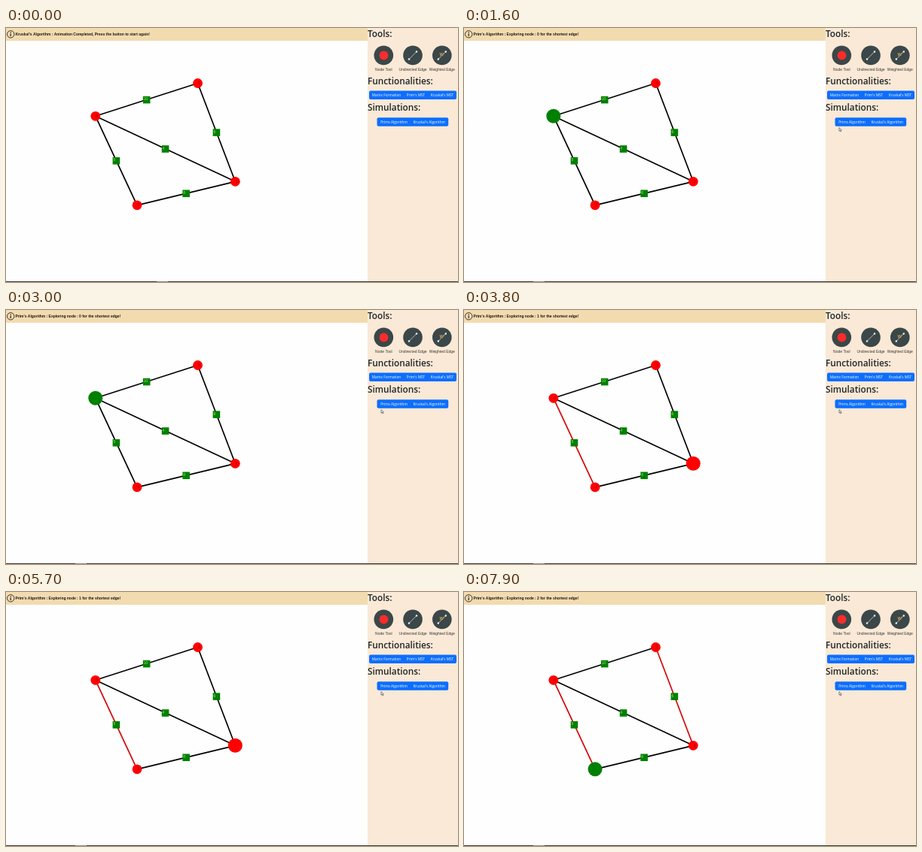
These frames come from a looping animation (600x338 px, 8 s). An HTML page with a canvas:

```html
<!DOCTYPE html>
<html lang="en">
<head>
<meta charset="utf-8">
<title>Minimum spanning tree</title>
<style>
html, body { margin: 0; width: 100%; height: 100%; overflow: hidden; background: #fff; }
canvas { display: block; width: 600px; height: 338px; }
</style>
</head>
<body>
<canvas id="stage" width="600" height="338"></canvas>
<script>
const ctx = document.getElementById('stage').getContext('2d');
const LOOP = 8000, START = 700, STEP = 3000;
const ARIAL = '"Liberation Sans", Arial, sans-serif';
const UI = '"Open Sans", "Noto Sans", sans-serif';

const nodes = [[118.8, 117.3], [304.3, 204.3], [174, 235.8], [254.5, 73.5]];
// from, to, weight, step at which the edge joins the tree
const edges = [
  [0, 3, '10', 9], [0, 1, '4', 9], [0, 2, '5', 1], [3, 1, '6', 2], [2, 1, '8', 9]
];
const activeColor = ['#008000', '#ff0000', '#008000'];

function text(str, x, y, font, color, align = 'left') {
  ctx.font = font;
  ctx.fillStyle = color;
  ctx.textAlign = align;
  ctx.fillText(str, x, y);
}

function disc(x, y, r, color) {
  ctx.fillStyle = color;
  ctx.beginPath();
  ctx.arc(x, y, r, 0, Math.PI * 2);
  ctx.fill();
}

function line(x1, y1, x2, y2, width, color) {
  ctx.strokeStyle = color;
  ctx.lineWidth = width;
  ctx.beginPath();
  ctx.moveTo(x1, y1);
  ctx.lineTo(x2, y2);
  ctx.stroke();
}

function rect(x, y, w, h, color) {
  ctx.fillStyle = color;
  ctx.fillRect(x, y, w, h);
}

function buttons(x, y, w, labels) {
  ctx.fillStyle = '#0d6efd';
  ctx.beginPath();
  ctx.roundRect(x, y, w, 11.6, 2);
  ctx.fill();
  for (const [label, cx] of labels) text(label, cx, y + 7.6, '4.75px ' + UI, '#fff', 'center');
}

function edgeIcon(x, y) {
  line(x - 5, y + 5, x + 5, y - 5, 0.8, '#d5dada');
  disc(x - 5, y + 5, 1.2, '#f4f4f4');
  disc(x + 5, y - 5, 1.2, '#f4f4f4');
}

function header(step) {
  rect(0, 0, 480, 17, '#f3dbb0');
  ctx.strokeStyle = '#222';
  ctx.lineWidth = 0.9;
  ctx.beginPath();
  ctx.arc(6.2, 8.3, 4.7, 0, Math.PI * 2);
  ctx.stroke();
  disc(6.2, 6, 0.75, '#222');
  line(6.2, 7.5, 6.2, 11, 1.2, '#222');
  const message = step < 0
    ? "Kruskal's Algorithm : Animation Completed, Press the button to start again!"
    : `Prim's Algorithm : Exploring node : ${step} for the shortest edge!`;
  text(message, 12.5, 10, 'bold 4.97px ' + ARIAL, '#1c1a16');
}

function sidebar() {
  rect(480, 0, 120, 338, '#f9e9d6');
  [['Tools:', 12.2], ['Functionalities:', 75], ['Simulations:', 110.3]]
    .forEach(([label, y]) => text(label, 480, y, '600 11.8px ' + UI, '#212529'));
  [['Node Tool', 501.3], ['Undirected Edge', 540], ['Weighted Edge', 578.8]]
    .forEach(([label, x]) => {
      disc(x, 36.4, 12.8, '#3b4748');
      text(label, x, 57.3, '5px ' + ARIAL, '#3b3732', 'center');
    });
  disc(501.5, 36.5, 5.9, '#fa2c2c');
  edgeIcon(540, 36.5);
  edgeIcon(578.8, 36.5);
  text('w', 578.3, 37.4, 'bold 7px ' + ARIAL, '#c9a04a', 'center');
  buttons(482, 83.5, 116, [['Matrix Formation', 505], ["Prim's MST", 544], ["Kruskal's MST", 579]]);
  buttons(492.5, 119.2, 94.7, [['Prims Algorithm', 515], ["Kruskal's Algorithm", 561.7]]);
}

function graph(step) {
  for (const [a, b, , joined] of edges) {
    line(...nodes[a], ...nodes[b], 1.7, step >= joined ? '#d40808' : '#000');
  }
  for (const [a, b, weight] of edges) {
    const x = (nodes[a][0] + nodes[b][0]) / 2, y = (nodes[a][1] + nodes[b][1]) / 2;
    rect(x - 4.8, y - 4.6, 9.6, 9.6, '#008000');
    text(weight, x - 4, y + 0.8, '5px ' + ARIAL, '#a8e070');
  }
  nodes.forEach(([x, y], i) => {
    if (i === step) return disc(x, y, 9.5, activeColor[i]);
    disc(x, y, 6.4, '#ff0000');
    text(i, x + 0.6, y + 1.2, '4.6px ' + ARIAL, '#8a0000');
  });
}

function pointer(x, y) {
  ctx.beginPath();
  [[0, 0], [0, 4.6], [1.1, 3.6], [1.9, 5.2], [2.6, 4.9], [1.9, 3.3], [3.3, 3.2]]
    .forEach(([dx, dy]) => ctx.lineTo(x + dx, y + dy));
  ctx.closePath();
  ctx.fillStyle = '#fff';
  ctx.fill();
  ctx.strokeStyle = '#333';
  ctx.lineWidth = 0.6;
  ctx.stroke();
}

function draw(now) {
  const t = now % LOOP;
  const step = Math.floor((t - START) / STEP);
  rect(0, 0, 600, 338, '#fefefe');
  header(step);
  graph(step);
  sidebar();
  rect(0, 337, 600, 1, '#3a3a3a');
  rect(step < 0 ? 200 : 92, 337, 15, 1, '#8a8a8a');
  if (step >= 0) pointer(498, 132.6);
  requestAnimationFrame(draw);
}
requestAnimationFrame(draw);
</script>
</body>
</html>
```
